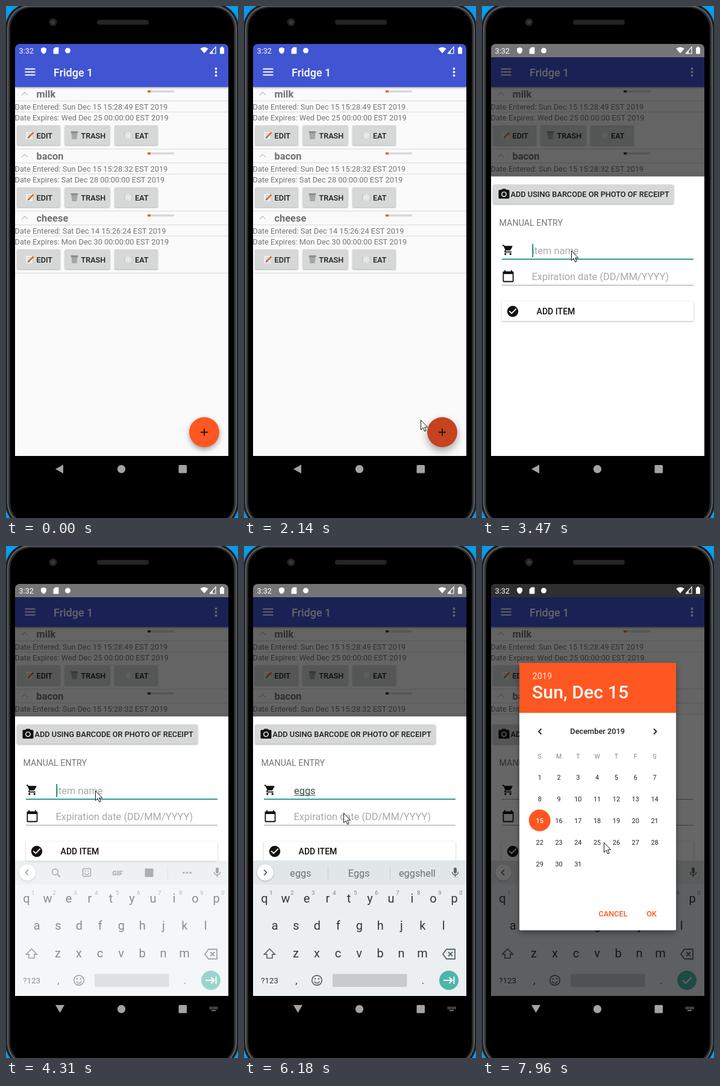
Animation, 385 px wide and 850 px high, one loop 8000 ms. Source, as an HTML page with a canvas:

```html
<!DOCTYPE html>
<html lang="en">
<head>
<meta charset="utf-8">
<title>Fridge app</title>
<style>
html, body { margin: 0; width: 100%; height: 100%; overflow: hidden; background: #0b9ae6 }
canvas { display: block; width: 385px; height: 850px }
</style>
</head>
<body>
<canvas width="385" height="850"></canvas>
<script>
const LOOP = 8000;
const screenCtx = document.querySelector('canvas').getContext('2d');
const buffer = document.createElement('canvas');
buffer.width = 385;
buffer.height = 850;
const bufferCtx = buffer.getContext('2d');
let g = screenCtx;

const BLUE = '#4154d2', ORANGE = '#ff5722', TEAL = '#0b8a7a', GREY = '#757575', KEY = '#2c3a40';

const ICONS = {
  cart: 'M7 18a2 2 0 1 0 .01 0zM1 2v2h2l3.6 7.59-1.35 2.45C4.5 15.4 5.5 17 7 17h12v-2H7.42c-.2 0-.3-.2-.22-.37l.9-1.63h7.45c.75 0 1.41-.41 1.75-1.03l3.58-6.49A1 1 0 0 0 20 4H5.21l-.94-2zM17 18a2 2 0 1 0 .01 0z',
  date: 'M20 3h-1V1h-2v2H7V1H5v2H4c-1.1 0-2 .9-2 2v16c0 1.1.9 2 2 2h16c1.1 0 2-.9 2-2V5c0-1.1-.9-2-2-2zm0 18H4V8h16z',
  camera: 'M9 2L7.2 4H4c-1.1 0-2 .9-2 2v12c0 1.1.9 2 2 2h16c1.1 0 2-.9 2-2V6c0-1.1-.9-2-2-2h-3.2L15 2zM12 17a5 5 0 1 1 .01 0zM12 8.8a3.2 3.2 0 1 0 .01 0z',
  check: 'M12 2a10 10 0 1 0 .01 0zM10 17l-5-5 1.4-1.4 3.6 3.6 7.6-7.6L19 8z',
  mic: 'M12 14c1.7 0 3-1.3 3-3V5a3 3 0 0 0-6 0v6c0 1.7 1.3 3 3 3zm5.3-3c0 3-2.5 5.1-5.3 5.1S6.7 14 6.7 11H5c0 3.4 2.7 6.2 6 6.7V21h2v-3.3c3.3-.5 6-3.3 6-6.7z',
  shield: 'M12 1L3 5v6c0 5.5 3.8 10.7 9 12 5.2-1.3 9-6.5 9-12V5z',
  card: 'M18 2h-8L4 8v12c0 1.1.9 2 2 2h12c1.1 0 2-.9 2-2V4c0-1.1-.9-2-2-2z',
  wifi: 'M12 21L0 7q12-9 24 0z',
  shift: 'M12 3L2 13h5v7h10v-7h5z',
  back: 'M8 4h14v16H8L2 12zM11 8.5l7 7M18 8.5l-7 7'
};
for (const name in ICONS) ICONS[name] = new Path2D(ICONS[name]);

function icon(name, x, y, scale, color, outline) {
  g.save();
  g.translate(x, y);
  g.scale(scale, scale);
  g.translate(-12, -12);
  if (outline) {
    g.strokeStyle = color;
    g.lineWidth = 1.8;
    g.stroke(ICONS[name]);
  } else {
    g.fillStyle = color;
    g.fill(ICONS[name], 'evenodd');
  }
  g.restore();
}

function text(s, x, y, size, color, weight = 400, align = 'left') {
  g.font = `${weight} ${size}px Roboto, sans-serif`;
  g.textAlign = align;
  g.fillStyle = color;
  g.fillText(s, x, y);
}

function rect(x, y, w, h, color, r = 0) {
  g.fillStyle = color;
  g.beginPath();
  g.roundRect(x, y, w, h, r);
  g.fill();
}

function disc(x, y, r, color) {
  g.fillStyle = color;
  g.beginPath();
  g.arc(x, y, r, 0, 7);
  g.fill();
}

function ring(x, y, r, color, width) {
  g.strokeStyle = color;
  g.lineWidth = width;
  g.beginPath();
  g.arc(x, y, r, 0, 7);
  g.stroke();
}

function poly(points, fill, stroke, width = 1) {
  g.beginPath();
  points.forEach(([x, y]) => g.lineTo(x, y));
  if (fill) {
    g.closePath();
    g.fillStyle = fill;
    g.fill();
  }
  if (stroke) {
    g.strokeStyle = stroke;
    g.lineWidth = width;
    g.stroke();
  }
}

function shadowed(blur, dy, alpha, draw) {
  g.save();
  g.shadowColor = `rgba(0,0,0,${alpha})`;
  g.shadowBlur = blur;
  g.shadowOffsetY = dy;
  draw();
  g.restore();
}

// Draws as one flat layer inside the phone display.
function layer(alpha, dy, draw) {
  if (alpha <= 0) return;
  g = bufferCtx;
  g.clearRect(0, 0, 385, 850);
  draw();
  g = screenCtx;
  g.save();
  g.beginPath();
  g.roundRect(15, 63, 354, 728, 8);
  g.clip();
  g.globalAlpha = alpha;
  g.drawImage(buffer, 0, dy);
  g.restore();
}

const ramp = (t, a, b) => Math.min(1, Math.max(0, (t - a) / (b - a)));
const smooth = p => p * p * (3 - 2 * p);

function phone() {
  rect(0, 0, 385, 850, '#0b9ae6');
  rect(-1, -4, 387, 870, '#1d1e20', 40);
  rect(2, -1, 381, 864, '#606366', 38);
  rect(4, 1, 377, 860, '#2a2b2d', 36);
  rect(7, 3, 371, 856, '#000', 34);
  disc(78, 27, 6.5, '#242426');
  disc(78, 27, 3, '#3a3a3d');
  rect(151, 23, 86, 8, '#242426', 4);
}

function statusBack(color) {
  rect(15, 63, 354, 22, color, [8, 8, 0, 0]);
}

function statusIcons() {
  text('3:32', 21.5, 78.5, 12.7, '#fff');
  icon('shield', 62.5, 74, .5, '#fff');
  icon('card', 83, 74, .55, '#fff');
  disc(102.5, 74, 4.5, '#fff');
  icon('wifi', 329, 73.5, .56, '#fff');
  poly([[338, 79], [348, 79], [348, 68], [338, 79]], null, '#fff', 1.2);
  poly([[338, 79], [343, 79], [343, 73.5]], '#fff');
  rect(355, 69, 7, 10.5, '#fff', 1);
  rect(357, 67.5, 3, 2, '#fff');
}

function memo(x, y) {
  rect(x - 6, y - 6, 10, 12, '#f4f4f4', 1);
  for (let i = 0; i < 4; i++) rect(x - 4, y - 4 + i * 2.5, 6, .8, '#a9b4ba');
  poly([[x - 2, y + 3], [x + 6, y - 5]], null, '#e8692c', 2.6);
  poly([[x - 3.5, y + 4.5], [x - 1.5, y + 2.5]], null, '#554', 1.4);
}

function bin(x, y) {
  poly([[x - 5, y - 5], [x + 5, y - 5], [x + 4, y + 6], [x - 4, y + 6]], '#999da0');
  for (let i = -1; i < 2; i++) rect(x + i * 2.5 - .4, y - 3, .8, 8, '#b9bdbf');
  rect(x - 6, y - 7, 12, 2.5, '#85898c', 1);
}

function plate(x, y) {
  disc(x, y, 5, '#ecefef');
  ring(x, y, 3, '#d0d4d4', .8);
  rect(x - 7, y - 5, 1, 10, '#c3c6c7');
  rect(x + 6, y - 5, 1, 10, '#c3c6c7');
}

function button(label, x, w, y, glyph, glyphX, labelX) {
  shadowed(2, 1, .3, () => rect(x, y, w, 33, '#d6d7d7', 2));
  glyph(x + glyphX, y + 17);
  text(label, x + labelX, y + 22, 12.7, '#1c1c1c', 500);
}

function foodItem(y, name, entered, expires, barColor) {
  poly([[26, y + 14], [31, y + 9], [36, y + 14]], null, '#999', 1);
  text(name, 50.5, y + 18, 16.4, '#707070', 700);
  rect(235, y + 6, 44, 3.5, '#d8d8d8');
  rect(235, y + 6, 5, 3.5, barColor);
  text('Date Entered: ' + entered + ' EST 2019', 14.5, y + 37.5, 12.8, GREY);
  text('Date Expires: ' + expires + ' 00:00:00 EST 2019', 14.5, y + 55.5, 12.8, GREY);
  for (const dy of [23, 41.5, 103]) rect(15, y + dy, 354, 1, '#d9d9d9');
  button('EDIT', 18, 72, y + 64, memo, 21.5, 32.5);
  button('TRASH', 97.5, 75, y + 64, bin, 16, 27);
  button('EAT', 180, 72, y + 64, plate, 23, 34);
}

function home(t) {
  rect(15, 85, 354, 662, '#fafafa');
  const bar = t < 2200 || t > 7030 ? ORANGE : '#24382c';
  foodItem(134, 'milk', 'Sun Dec 15 15:28:49', 'Wed Dec 25', bar);
  foodItem(237, 'bacon', 'Sun Dec 15 15:28:32', 'Sat Dec 28', bar);
  foodItem(340, 'cheese', 'Sat Dec 14 15:26:24', 'Mon Dec 30', bar);
  const pressed = t >= 1060;
  const lifted = t >= 2110;
  shadowed(lifted ? 13 : 8, lifted ? 6 : 4, .35, () => disc(329, 707.5, 25, pressed ? '#c5431f' : ORANGE));
  rect(323, 706.7, 12, 1.8, '#111');
  rect(328.1, 701.6, 1.8, 12, '#111');
  shadowed(3, 1, .3, () => rect(15, 85, 354, 49.5, BLUE));
  statusBack(BLUE);
  for (let i = 0; i < 3; i++) {
    rect(31.5, 103.5 + i * 5, 17, 2, '#fff');
    disc(348.5, 104 + i * 5.7, 1.9, '#fff');
  }
  text('Fridge 1', 79, 117, 18, '#fff', 500);
}

function navBar(keyboardOpen) {
  rect(15, 747, 354, 44, '#000');
  const c = '#a3a3a3';
  if (keyboardOpen) {
    poly([[82, 762], [97, 762], [89.5, 775]], c);
    for (let i = 0; i < 12; i++) rect(338 + i % 6 * 2.4, 765 + (i / 6 | 0) * 2.5, 1.4, 1.4, c);
    rect(341, 770.5, 7, 1.4, c);
  } else poly([[95, 761.5], [95, 776], [82, 768.7]], c);
  disc(191.5, 768.7, 6.7, c);
  rect(286.5, 762, 13.5, 13.5, c, 1.5);
}

function dim(a) {
  rect(15, 63, 354, 684, `rgba(0,0,0,${a})`, [8, 8, 0, 0]);
}

function typed(t) {
  return 'eggs'.slice(0, [4680, 4920, 5080, 5220].filter(k => t >= k).length);
}

function underline(y, focused) {
  rect(33, focused ? y - .5 : y, 318, focused ? 1.7 : 1, focused ? TEAL : '#999');
}

function sheet(t) {
  const onName = t >= 3470 && t < 6250, onDate = t >= 6250 && t < 7030;
  const word = typed(t);
  rect(15, 283, 354, 464, '#fff');
  shadowed(3, 1, .35, () => rect(18, 296.5, 300, 32, '#d6d7d7', 2));
  icon('camera', 36.5, 312.5, .9, '#111');
  text('ADD USING BARCODE OR PHOTO OF RECEIPT', 47.5, 317.2, 12.75, '#1c1c1c', 500);
  text('MANUAL ENTRY', 28.5, 364.7, 14.3, GREY);
  icon('cart', 43, 405, .84, '#111');
  icon('date', 43.5, 448.5, .9, '#111');
  text(word || 'item name', 83, 412, 16.4, word ? '#35504d' : '#a8a8a8');
  const width = word ? g.measureText(word).width : 0;
  if (onName && word) rect(83, 413.5, width, 1, '#35504d');
  if (onName && t < 5680) rect(83.3 + width, 395, 1.8, 22, TEAL);
  text('Expiration date (DD/MM/YYYY)', 82.5, 455, 16.4, '#a8a8a8');
  underline(420, onName);
  underline(463, onDate);
  shadowed(3, 1, .28, () => rect(33, 490.5, 318, 32.5, '#fff', 2));
  icon('check', 51, 507, .92, '#111');
  text('ADD ITEM', 90.5, 512.3, 14.1, '#111', 500);
}

function suggestions(word) {
  const words = { e: ['e', 'even', 'each'], eg: ['eg', 'eggs', 'egg'], egg: ['egg', 'eggs', 'Egg'], eggs: ['eggs', 'Eggs', 'eggshell'] }[word];
  words.forEach((s, i) => text(s, 94 + i * 96.7, 548.5, 16.3, '#6a7378', 400, 'center'));
  rect(139, 532, 1, 21, '#c9ced1');
  rect(242, 532, 1, 21, '#c9ced1');
}

function toolbar() {
  const c = '#6a7378';
  ring(81.5, 541, 4.8, c, 1.7);
  poly([[85, 544.5], [90, 549.5]], null, c, 2);
  g.strokeStyle = c;
  g.lineWidth = 1.6;
  g.beginPath();
  g.roundRect(127.5, 535.5, 13, 13, 2);
  g.moveTo(137.5, 542.5);
  g.arc(134, 542.5, 3.5, 0, Math.PI);
  g.stroke();
  disc(131.5, 539.5, 1.1, c);
  disc(136.5, 539.5, 1.1, c);
  text('GIF', 185, 546.5, 11.5, c, 900, 'center');
  rect(230.5, 535.5, 14, 14, c, 1);
  rect(268, 532, 1, 21, '#c9ced1');
  for (let i = 0; i < 3; i++) disc(295 + i * 5.5, 542.5, 1.8, c);
}

function keyboard(t) {
  const suggesting = t >= 4680 && t < 6350;
  rect(15, 522, 354, 225, '#ebeff1');
  rect(15, 522, 354, 40, '#e1e6e8');
  shadowed(3, 1, .25, () => disc(35.5, 542, 13.5, '#fff'));
  const dir = suggesting ? 1 : -1;
  poly([[35 - 2 * dir, 537.5], [35 + 2.5 * dir, 542], [35 - 2 * dir, 546.5]], null, '#48545a', 1.7);
  if (suggesting) suggestions(typed(t)); else toolbar();
  icon('mic', 350.5, 542, .82, '#5b666b');
  const row = (keys, x, y) => [...keys].forEach((k, i) => text(k, x + i * 35, y, 20, KEY, 400, 'center'));
  row('qwertyuiop', 34, 592);
  row('asdfghjkl', 51.3, 637);
  row('zxcvbnm', 86, 683);
  [...'1234567890'].forEach((d, i) => text(d, 45 + i * 35, 579, 9.5, '#7b868b', 400, 'center'));
  icon('shift', 42.5, 677, .9, '#566268', true);
  icon('back', 340, 677.5, 1, '#566268', true);
  text('?123', 42.5, 726, 13.3, KEY, 400, 'center');
  text(',', 87, 727, 17, KEY, 400, 'center');
  text('.', 297, 727, 17, KEY, 400, 'center');
  ring(121, 721, 8.2, '#566268', 1.7);
  disc(118, 718.5, 1.3, '#566268');
  disc(124, 718.5, 1.3, '#566268');
  g.beginPath();
  g.arc(121, 721.5, 4.2, .3, 2.85);
  g.stroke();
  rect(147, 710.5, 123.5, 21.5, '#c6cbce', 2);
  disc(340, 721, 16, '#4db6a9');
  if (t < 6470) {
    poly([[331, 721], [345, 721]], null, '#fff', 2);
    poly([[340.5, 716], [345.5, 721], [340.5, 726]], null, '#fff', 2);
    rect(347.5, 715, 2, 12, '#fff');
  } else poly([[333, 721], [338, 726], [347.5, 716]], null, '#fff', 2);
}

function calendar() {
  shadowed(10, 4, .35, () => rect(62, 194, 260, 444, '#fff', 2));
  rect(62, 194, 260, 83, ORANGE, [2, 2, 0, 0]);
  text('2019', 83.5, 221, 14.4, 'rgba(255,255,255,.7)', 500);
  text('Sun, Dec 15', 83, 253.3, 30.3, '#fff', 500);
  poly([[98.5, 303.5], [94, 308], [98.5, 312.5]], null, '#222', 1.8);
  poly([[285, 303.5], [289.5, 308], [285, 312.5]], null, '#222', 1.8);
  text('December 2019', 191.7, 312.3, 12.8, '#222', 500, 'center');
  const colX = i => 95.7 + i % 7 * 31.8;
  [...'SMTWTFS'].forEach((d, i) => text(d, colX(i), 353, 10.6, '#858585', 400, 'center'));
  disc(95.7, 455.5, 18, ORANGE);
  for (let d = 0; d < 31; d++)
    text(d + 1, colX(d), 387.5 + (d / 7 | 0) * 36, 10.9, d == 14 ? '#fff' : '#222', d == 14 ? 500 : 400, 'center');
  text('CANCEL', 193.5, 615, 12.7, ORANGE, 500);
  text('OK', 273, 615, 12.7, ORANGE, 500);
}

// Time, x, y of the pointer tip.
const MOUSE = [
  [380, 312, 789], [680, 325, 710], [1700, 325, 710], [1920, 299, 694], [2080, 299, 694],
  [2140, 293, 687], [2240, 261, 647], [2690, 196, 476], [2860, 196, 476], [3080, 148, 406],
  [5800, 148, 406], [6000, 165, 443], [7500, 165, 443], [7650, 164, 464], [7740, 164, 464],
  [7960, 202, 492], [LOOP, 202, 492]
];
const CLICKS = [[830, 920], [3240, 3320], [6100, 6180]];

function mouse(t) {
  if (t < 380) return;
  const i = MOUSE.findIndex(k => k[0] > t);
  const [a, b] = [MOUSE[i - 1], MOUSE[i]];
  const p = ramp(t, a[0], b[0]);
  const x = Math.round(a[1] + (b[1] - a[1]) * p);
  const y = Math.round(a[2] + (b[2] - a[2]) * p);
  if (CLICKS.some(([from, to]) => t >= from && t < to)) {
    ring(x, y, 14, '#000', 1);
    ring(x, y, 13, '#fff', 1);
  }
  g.save();
  g.translate(x + .5, y + .5);
  poly([[0, 0], [0, 16], [3.7, 12.6], [6.2, 18.5], [8.7, 17.4], [6.2, 11.7], [11.2, 11.7], [0, 0]], '#fff', '#111');
  g.restore();
}

function draw(t) {
  const p = smooth(ramp(t, 2160, 2320));
  const dialog = ramp(t, 7000, 7100);
  phone();
  home(t);
  navBar(t >= 4280);
  if (t < 6980) dim(.6 * Math.min(1, p * 1.27));
  if (p == 1) statusBack('#757575');
  layer(p, 146 * (1 - p), () => sheet(t));
  if (t >= 3960) layer(.4 + .6 * ramp(t, 4260, 4440), 0, () => keyboard(t));
  dim(.6 * dialog);
  statusIcons();
  layer(dialog, 0, calendar);
  mouse(t);
}

function tick() {
  draw(performance.now() % LOOP);
  requestAnimationFrame(tick);
}
tick();
</script>
</body>
</html>
```
